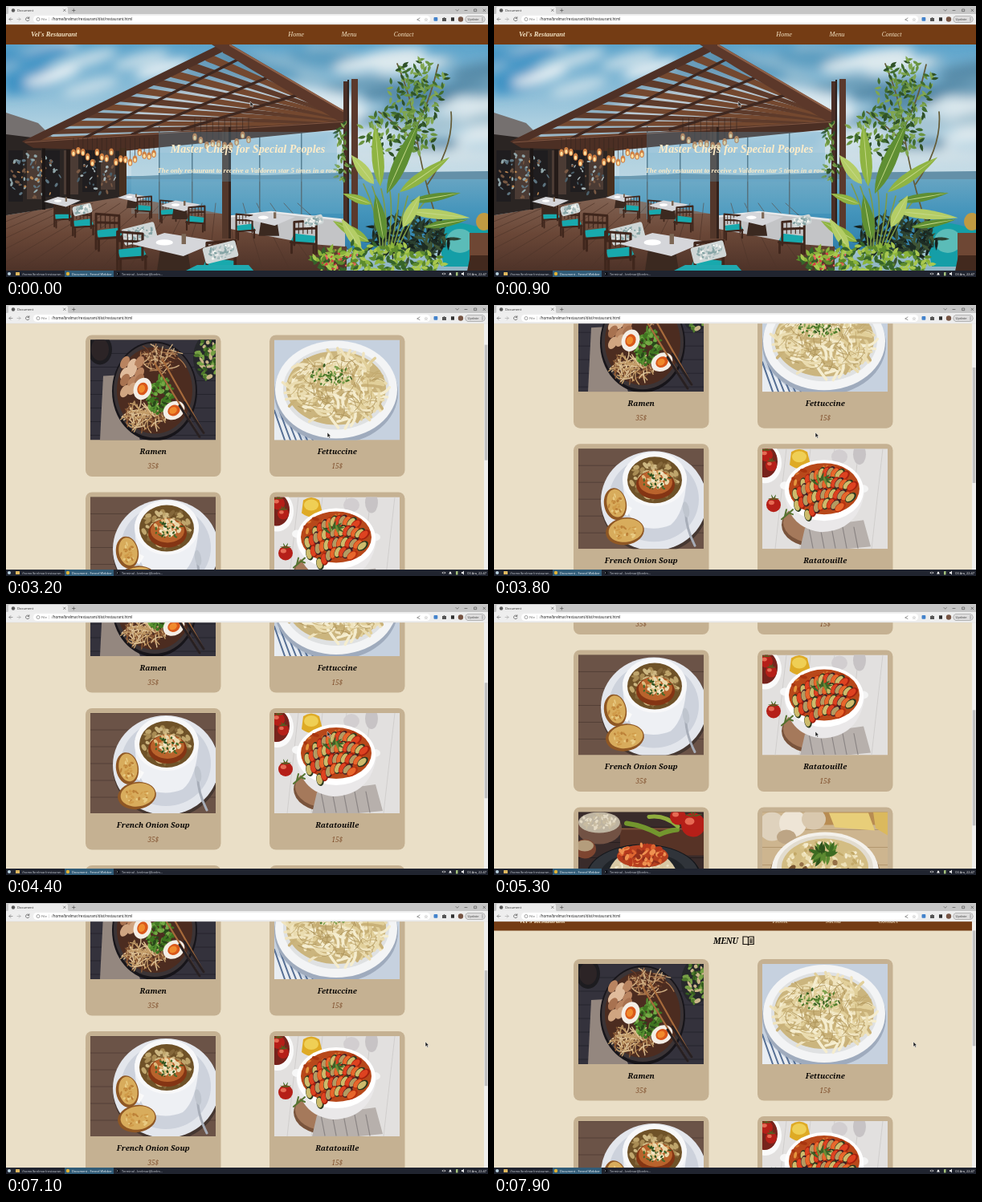
An HTML page that plays this animation: 600 by 338 pixels, repeating every 8 s.

```html
<!DOCTYPE html>
<html lang="en">
<head>
<meta charset="utf-8">
<title>Restaurant</title>
<style>
html, body { margin: 0; width: 100%; height: 100%; overflow: hidden; background: #eadfc7; }
svg { display: block; width: 600px; height: 338px; }
.ui { font-family: "Noto Sans", "Open Sans", sans-serif; }
.script { font-family: "Liberation Serif", serif; font-style: italic; }
.plain { font-family: "Liberation Serif", serif; }
.fancy { font-family: "Noto Serif", serif; font-style: italic; }
.bold { font-weight: bold; }
</style>
</head>
<body>
<svg id="stage" viewBox="0 0 600 338" xmlns="http://www.w3.org/2000/svg"></svg>
<script>
// --- drawing helpers -------------------------------------------------
let seed = 7;
const rnd = () => (seed = (seed * 16807) % 2147483647) / 2147483647;
const pick = list => list[Math.floor(rnd() * list.length)];
const n = v => +v.toFixed(1);
const rect = (x, y, w, h, fill, r = 0) =>
  `<rect x="${n(x)}" y="${n(y)}" width="${n(w)}" height="${n(h)}" rx="${r}" fill="${fill}"/>`;
const oval = (x, y, rx, ry, fill, turn = 0) =>
  `<ellipse cx="${n(x)}" cy="${n(y)}" rx="${n(rx)}" ry="${n(ry)}" fill="${fill}" transform="rotate(${n(turn)} ${n(x)} ${n(y)})"/>`;
const path = (d, fill) => `<path d="${d}" fill="${fill}"/>`;
const line = (d, color, w = 1) =>
  `<path d="${d}" fill="none" stroke="${color}" stroke-width="${n(w)}" stroke-linecap="round"/>`;
const text = (x, y, s, size, cls, fill, anchor = 'middle') =>
  `<text x="${x}" y="${y}" font-size="${size}" class="${cls}" fill="${fill}" text-anchor="${anchor}">${s}</text>`;
const group = (s, attrs = '') => `<g ${attrs}>${s}</g>`;
const times = (count, make) => Array.from({ length: count }, (_, i) => make(i)).join('');
const grad = (id, stops) =>
  `<linearGradient id="${id}" x2="0" y2="1">${stops.map((c, i) =>
    `<stop offset="${i / (stops.length - 1)}" stop-color="${c}"/>`).join('')}</linearGradient>`;

// random points inside an ellipse
const scatter = (count, cx, cy, rx, ry, make) => times(count, () => {
  const a = rnd() * 6.283, r = Math.sqrt(rnd());
  return make(cx + Math.cos(a) * r * rx, cy + Math.sin(a) * r * ry);
});
const crumbs = (count, cx, cy, rx, ry, size, colors) =>
  scatter(count, cx, cy, rx, ry, (x, y) => oval(x, y, size * (.6 + rnd()), size * (.4 + rnd() * .5), pick(colors), rnd() * 180));
// short curved strands with a rounded belly
const strands = (count, cx, cy, rx, ry, len, w, colors) =>
  scatter(count, cx, cy, rx, ry, (x, y) => {
    const a = rnd() * 6.283, dx = Math.cos(a) * len / 2, dy = Math.sin(a) * len / 2, b = (rnd() - .5) * 1.6;
    return line(`M${n(x - dx)} ${n(y - dy)}Q${n(x - dy * b)} ${n(y + dx * b)} ${n(x + dx)} ${n(y + dy)}`, pick(colors), w);
  });
const leaf = (x, y, turn, len, w, fill) =>
  `<path d="M0 0Q${len * .35} ${-w} ${len} 0Q${len * .35} ${w} 0 0" fill="${fill}" transform="translate(${n(x)} ${n(y)}) rotate(${n(turn)})"/>`;

// --- dishes, 156 x 125 each -----------------------------------------
const planks = (base, seam, step) =>
  rect(0, 0, 156, 125, base) + times(Math.ceil(125 / step), i => line(`M0 ${i * step}H156`, seam, .8));

const egg = (x, y, turn) => oval(x, y, 11, 14, '#f4eee6', turn) +
  oval(x, y, 6.5, 8, '#d9581a', turn) + oval(x - 1, y, 4, 5, '#f08a2c', turn);

const ramen = () => planks('#34323c', '#22212a', 17) +
  path('M16 45L34 44 62 125H12Z', '#94877f') +
  oval(12, 12, 15, 19, '#1d1c20') + oval(12, 12, 11, 14, '#2c2426') +
  oval(146, 22, 18, 28, '#26282b') + crumbs(60, 147, 22, 15, 26, 3, ['#4f7a2c', '#77a045', '#355c20', '#c9b588']) +
  oval(80, 64, 53, 62, '#17151a') + oval(80, 63, 51, 59, '#3b3436') + oval(80, 63, 47, 54, '#4c2c20') +
  strands(60, 88, 24, 29, 13, 15, 1.3, ['#cfae82', '#a97950', '#6a3c26']) +
  strands(90, 68, 96, 26, 15, 15, 1.4, ['#dcc094', '#c39c68', '#8c5a35']) +
  times(12, i => oval(43 + (i % 3) * 9, 28 + Math.floor(i / 3) * 11 + (i % 2) * 3, 5, 8.5, pick(['#d0a581', '#b98460', '#e0bc9c', '#a87250']), 30)) +
  crumbs(120, 86, 68, 17, 24, 2.8, ['#3f7420', '#568f30', '#28491a', '#73a844']) +
  egg(65, 61, 20) + egg(104, 88, 60) +
  line('M80 29L136 121M90 25L141 116', '#a66a3b', 2.2) + line('M111 82L136 121M117 78L141 116', '#272022', 3);

const fettuccine = () => rect(0, 0, 156, 125, '#c6d1df') +
  path('M0 92L38 125H0Z', '#e9edf2') +
  times(6, i => line(`M${i * 7} ${88 + i * 2}L${i * 7 + 13} 125`, '#566f94', 2)) +
  oval(77, 66, 77, 63, '#9fabbd') + oval(77, 62, 76, 61, '#f3f4f5') + oval(77, 61, 66, 51, '#dfe1e2') +
  oval(77, 60, 62, 46, '#cbb57e') +
  strands(190, 77, 60, 57, 42, 23, 3.4, ['#eadcb0', '#e1cf9a', '#f5edcf', '#c9b178', '#f0e4bf']) +
  strands(80, 77, 60, 55, 40, 17, .8, ['#a98f54', '#bfa66b']) +
  crumbs(60, 70, 44, 27, 13, 1.7, ['#4e7c2b', '#7ca04c', '#355c20']);

const bread = (x, y, rx, ry, turn) => oval(x, y, rx, ry, '#8f5724', turn) +
  oval(x + 1, y - 1, rx - 2.5, ry - 2.5, '#d8ac5c', turn) +
  crumbs(24, x, y, rx * .6, ry * .6, 2, ['#e8ca82', '#bc8138', '#d09b49']);

const onionSoup = () => planks('#6b5347', '#4f3c34', 21) +
  oval(95, 68, 67, 63, '#453731') + oval(94, 65, 66, 62, '#e3e6ec') + oval(94, 63, 56, 53, '#cdd2dc') +
  path('M55 34Q57 93 80 98Q99 102 115 95Q133 80 135 34Z', '#eef0f4') +
  path('M56 68Q50 78 61 84L67 74Z', '#fafafa') +
  oval(95, 38, 40, 34, '#f8f8f9') + oval(95, 39, 34, 29, '#6f5228') +
  crumbs(110, 95, 38, 29, 24, 3.2, ['#a98c54', '#cdb782', '#84673a', '#bfa56c']) +
  oval(96, 45, 24, 18, '#843514') + oval(96, 42, 21, 15, '#b9632c') +
  crumbs(50, 97, 38, 16, 10, 3, ['#ead8ac', '#dfbd80', '#cf9553', '#f1e6c6']) +
  crumbs(24, 98, 40, 18, 11, 1.6, ['#486a2a', '#2f521d']) +
  line('M134 74Q132 95 145 121', '#a7adb8', 3) + oval(134, 76, 4, 10, '#bfc5ce', -10) +
  bread(46, 69, 14, 20, -10) + bread(58, 103, 24, 17, -8);

const tomato = (x, y, r) => oval(x, y, r, r, '#b51f18') + oval(x - r * .3, y - r * .3, r * .4, r * .3, '#e66a53') +
  times(4, i => leaf(x, y - r * .7, i * 50 - 165, r * .8, 1.5, '#456a24'));

// one curved row of overlapping vegetable slices
const sliceRow = (y, half, count) => times(count, i => {
  const k = i / (count - 1) * 2 - 1, x = 77 + k * half, sy = y + k * k * 9 - k * 5, kind = i % 4;
  return oval(x, sy, 4.8, 8, ['#2c3a20', '#a3200f', '#3d1d24', '#b8300f'][kind], 20 + k * 30) +
    oval(x - .8, sy, 3.6, 6.4, ['#cdbb6c', '#de4220', '#b39b62', '#e8672c'][kind], 20 + k * 30);
});

const ratatouille = () => rect(0, 0, 156, 125, '#e2e0df') +
  times(6, i => line(`M${i * 30} 0L${i * 30 - 14} 125`, '#ccc9c8', .8)) +
  oval(4, 18, 20, 25, '#fafafa') + oval(3, 16, 16, 20, '#77231c') + tomato(5, 8, 8) + tomato(11, 21, 7) +
  path('M36 4Q46 -3 56 4L60 20Q47 30 34 20Z', '#deaa25') + oval(46, 10, 9, 7, '#efcf55') +
  oval(96, 10, 10, 9, '#d2ced0') + oval(121, 7, 8, 13, '#c7c3c5') +
  oval(66, 95, 42, 28, '#7a543c') + oval(66, 92, 40, 26, '#a5795b') +
  path('M53 99L126 89 135 122 105 125H47Z', '#b7b0ac') +
  times(5, i => line(`M${58 + i * 14} 98l5 26`, '#8b8584', 1.2)) +
  path('M27 50Q30 99 73 104Q121 103 128 50Z', '#eae8e9') + oval(28, 46, 6, 5, '#f7f7f7') + oval(125, 50, 7, 5, '#f3f3f3') +
  oval(77, 52, 49, 38, '#fff') + oval(77, 50, 44, 32, '#b8481a') +
  crumbs(50, 77, 44, 40, 25, 3, ['#d9752c', '#a8350f', '#e4953c']) +
  sliceRow(30, 25, 10) + sliceRow(43, 35, 14) + sliceRow(57, 33, 13) + sliceRow(69, 20, 8) +
  times(7, i => leaf(70 + i, 46 - i * 2, i * 35 - 140, 14, 3, pick(['#3d6427', '#6a8d36']))) +
  tomato(14, 70, 9) + line('M24 88L38 76M28 84l2 -8M33 80l5 2', '#55722f', 2);

const rice = () => planks('#392b2a', '#251d1e', 19) +
  rect(52, 20, 104, 34, '#573326') + line('M52 21H156', '#7d5038', 2) +
  oval(26, 20, 28, 20, '#725244') + oval(26, 13, 26, 13, '#beb4a1') + crumbs(70, 26, 12, 23, 10, 2, ['#e4dac4', '#c9bca1']) +
  oval(8, 46, 14, 12, '#7d4530') + oval(8, 42, 11, 7, '#b49d7c') +
  line('M60 14Q82 17 101 28Q112 23 123 22', '#73962e', 6) + line('M88 6Q108 3 124 18', '#90ad3d', 5) +
  tomato(143, 16, 15) + tomato(124, 6, 10) +
  oval(81, 82, 72, 42, '#14171b') + oval(81, 79, 69, 38, '#30343a') + oval(81, 79, 54, 29, '#202429') +
  path('M34 88Q40 48 79 46Q118 48 127 88Q80 111 34 88Z', '#d9caa6') +
  crumbs(150, 80, 79, 42, 20, 2, ['#eee3c6', '#d8c59b', '#f7efd9']) +
  oval(80, 55, 32, 14, '#b74120') + crumbs(65, 80, 54, 29, 13, 3.5, ['#df6631', '#b7391c', '#ef9150', '#92301b']);

const risotto = () => planks('#cdb58f', '#ad9168', 22) +
  rect(76, 0, 80, 16, '#b88c52') + path('M83 1H132L140 23 90 19Z', '#e8ce79') + path('M138 0H156V29L141 20Z', '#dbb95d') +
  oval(12, 18, 17, 18, '#dfd2bd') + oval(38, 14, 17, 17, '#eee5d6') + oval(64, 9, 15, 13, '#d9c8ae') + oval(30, 31, 12, 9, '#bda585') +
  oval(78, 79, 69, 51, '#977a57') + oval(78, 74, 67, 49, '#f4f1eb') + oval(78, 70, 60, 41, '#e2dccf') + oval(78, 69, 54, 36, '#d3bd83') +
  crumbs(180, 78, 69, 51, 34, 2.6, ['#ede0b6', '#d8c389', '#c3a968', '#f4ebcd']) +
  crumbs(20, 78, 69, 46, 28, 4, ['#76532f', '#957047']) +
  times(22, () => leaf(78 + (rnd() - .5) * 16, 49 + rnd() * 7, rnd() * 360, 15, 5, pick(['#3d6b22', '#5c8a31', '#2e511b'])));

// --- hero picture ----------------------------------------------------
const greens = ['#416c2f', '#6a9440', '#80a650', '#2f5127'];
const bulbs = (x0, x1, y, count, top) => times(count, i => {
  const x = x0 + (x1 - x0) * i / (count - 1), by = y + (rnd() - .5) * 16;
  return line(`M${n(x)} ${top}V${n(by)}`, '#35251f', .6) + oval(x, by + 3, 2.8, 4.6, '#cf7f42') + oval(x, by + 4, 1.6, 2.6, '#ffe2a2');
});
const table = (x, y, w) => path(`M${x - w * .16} ${y}h${w * .3}l${w * .05} ${w * .34}h${-w * .4}Z`, '#3b2920') +
  path(`M${x - w / 2} ${y}L${x - w * .12} ${y - w * .13}L${x + w / 2} ${y - w * .03}L${x + w * .1} ${y + w * .14}Z`, '#d5d6da') +
  oval(x - w * .12, y - w * .02, w * .1, w * .035, '#fff') + rect(x + w * .08, y - w * .12, w * .05, w * .12, '#7c6755');
const chair = (x, y, s, flip = 1) => group(
  path('M-13 0L12 -3 16 6 -10 9Z', '#18a9ad') +
  line('M-13 -18V20M-10 9V22M15 6V19M12 -16V10M-13 -18L12 -16M-13 -9L12 -8M-12 9L16 7', '#3f261c', 2.6) +
  line('M-8 -17V-3M-3 -17V-3M2 -16V-3M7 -16V-3', '#3f261c', 1),
  `transform="translate(${x} ${y}) scale(${s * flip} ${s})"`);
const cushion = (x, y, w) => group(rect(-w / 2, -w / 4, w, w / 2, '#cfd6d6', 3) +
  crumbs(45, 0, 0, w * .42, w * .2, 1.7, ['#86a4a5', '#f1f3ef', '#a9bdbd']), `transform="translate(${x} ${y}) rotate(-14)"`);

// roof slats fan out from the right corner to the sloping left edge
const slat = (k, fill) => {
  const x = 32 + 236 * k, y = 166 - 114 * k, end = 149 - 13 * k, w = 4 + 2.5 * k;
  return path(`M${n(x)} ${n(y)}L${n(x + 6)} ${n(y - w / 2)}L424 ${n(end - 1)}V${n(end + 2.5)}L${n(x + 2)} ${n(y + w)}Z`, fill);
};
const pergola = () =>
  path('M24 171L268 50 425 137V151Z', '#58677a').replace('<path', '<path opacity=".25"') +
  times(12, i => slat(i / 11, i % 2 ? '#5e3b2b' : '#74482f')) +
  times(3, i => line(`M${95 + i * 62} ${166 - i * 6}L${290 + i * 38} ${66 + i * 22}`, '#3f2820', 3.4)) +
  path('M20 169L262 50 274 48 276 54 32 173Z', '#4f3126') +
  path('M256 48H280L425 133V150L300 76Z', '#5c382a') + line('M279 49L425 134', '#8e6048', 2.2) +
  path('M20 169L425 143V153L145 181 34 177Z', '#4c2f24') + line('M24 170L425 144', '#805642', 1.2);

const clouds = () => group(
  scatter(14, 80, 78, 120, 28, (x, y) => oval(x, y, 36, 8, pick(['#e6eff3', '#c4dbe6', '#3f93c4']), -15)) +
  scatter(14, 360, 70, 90, 20, (x, y) => oval(x, y, 34, 9, pick(['#3c87b2', '#8fb9cf', '#5a9cc0']), 12)) +
  scatter(24, 520, 120, 110, 66, (x, y) => oval(x, y, 44, 9, pick(['#dce8ed', '#6d9fb9', '#a5c3d1', '#5589a7']), -8)) +
  oval(300, 130, 150, 32, '#dbe9f0') + oval(500, 188, 130, 10, '#cfdfe6'), 'filter="url(#soft)"');

const plants = () =>
  path('M536 278Q556 262 600 280V325H545Z', '#159ea7') + oval(565, 293, 17, 15, '#5bbcb8') + oval(595, 269, 10, 11, '#c09a42') +
  rect(577, 283, 23, 48, '#6e4734') + path('M578 311H600V331H574Z', '#42291e') +
  scatter(160, 505, 288, 48, 26, (x, y) => leaf(x, y, rnd() * 360, 16, 4, pick(['#1d2c24', '#2b4030', '#3f5536', '#16221e']))) +
  line('M538 272Q515 200 510 153Q505 115 487 72M510 153Q529 116 538 73M512 172Q480 142 464 132M525 222Q558 174 554 132', '#645b37', 1.7) +
  scatter(130, 512, 105, 36, 38, (x, y) => leaf(x, y, rnd() * 360, 9, 3.5, pick(greens))) +
  scatter(120, 490, 158, 46, 32, (x, y) => leaf(x, y, rnd() * 360, 10, 4, pick(greens))) +
  scatter(45, 420, 180, 9, 42, (x, y) => leaf(x, y, rnd() * 360, 8, 3, pick(greens))) +
  times(8, i => line(`M${466 + i * 3} 304Q${464 + i * 6} 262 ${445 + i * 11} ${222 + i * 3}`, '#7f9c46', 1.6)) +
  [[466, 225, -95, 78, 15], [474, 234, -66, 98, 17], [458, 222, -128, 46, 14], [490, 232, -35, 76, 13], [503, 244, -10, 64, 10],
   [500, 256, 6, 78, 12], [455, 247, -160, 38, 10], [520, 276, -10, 56, 9], [494, 276, -62, 45, 14], [452, 294, -150, 52, 13],
   [470, 292, -100, 58, 15], [442, 304, -122, 46, 13]]
    .map(([x, y, a, len, w], i) => leaf(x, y, a, len, w, ['#8fb443', '#5f8f33', '#b4cd66'][i % 3]) +
      leaf(x, y, a, len, 1, '#c6d98a')).join('') +
  scatter(260, 463, 319, 79, 22, (x, y) => leaf(x, y, rnd() * 360, 10, 4.5, pick(['#5d8b2d', '#8bb43b', '#a9c850', '#36642a']))) +
  crumbs(25, 416, 317, 25, 13, 1.6, ['#d73e43', '#ef6661']);

const hero = () => rect(0, 47, 600, 284, 'url(#sky)') + clouds() +
  rect(150, 212, 450, 92, 'url(#sea)') + path('M150 213L230 209 320 211 420 208 600 206V216H150Z', '#6490a8') +
  path('M0 261L145 237 285 262 424 300V331H0Z', 'url(#floor)') +
  times(20, i => line(`M${i * 34 - 190} 331L${40 + i * 17} 246`, '#50352a', .7)) +
  // building
  path('M0 133L40 146 60 166 0 172Z', '#75706f') + path('M0 160L145 178V238L0 261Z', '#2b2523') +
  times(6, i => rect(3 + i * 23, 180, 18, 64 - i * 3, i % 2 ? '#4b3b34' : '#1f1d1f')) +
  crumbs(70, 36, 212, 34, 28, 2, ['#bb8651', '#765843', '#8fa5a9', '#5d7480']) +
  crumbs(40, 115, 212, 28, 22, 2, ['#7a5a45', '#4a5f6a', '#a5b4b8']) +
  rect(45, 174, 4, 80, '#1c1716') + rect(75, 178, 5, 70, '#241b18') +
  // glass
  rect(156, 183, 264, 76, '#83bad0').replace('<rect', '<rect opacity=".22"') +
  times(4, i => rect([190, 231, 315, 367][i], 150, 1.5, 116, '#56727f')) +
  path('M274 263L330 257 422 267V300L380 297 274 277Z', '#c3c4c6') + line('M274 263L330 257 422 267', '#e6e8ea', 2.4) +
  pergola() +
  rect(141, 177, 9, 60, '#47301f') + rect(269, 151, 11, 139, '#53372a') + rect(277, 151, 3, 139, '#33211a') +
  rect(420, 94, 7, 184, '#4a2f26') + rect(430, 91, 8, 188, '#5b392c') + rect(425, 92, 2, 186, '#2f211c') +
  bulbs(84, 184, 185, 18, 165) + bulbs(235, 302, 166, 10, 140) +
  // furniture
  chair(70, 260, .75) + table(70, 244, 46) + chair(95, 268, .9) + table(158, 239, 38) + chair(172, 250, .7, -1) +
  chair(201, 255, .7) + table(217, 249, 50) + chair(237, 264, .8, -1) + cushion(95, 254, 24) + chair(127, 280, 1.15) +
  chair(297, 274, .8) + table(328, 265, 64) + chair(372, 287, 1.1, -1) + cushion(383, 268, 24) +
  cushion(166, 284, 42) + chair(155, 304, 1.25) + table(210, 297, 107) + chair(267, 318, 1.4, -1) + cushion(267, 307, 42) +
  path('M222 331L238 323H302L309 331Z', '#20a9b0') +
  plants();

// --- site pages ------------------------------------------------------
const cream = '#f3e3c4', brown = '#743c14', cardFill = '#c5b192', warm = '#fdecc8';
const nav = (id, shift) => group(rect(0, 23, 600, 25, brown) +
  text(31, 38, "Vel's Restaurant", 8.5, 'script bold', cream, 'start') +
  text(361 - shift, 38, 'Home', 8.2, 'script', cream) +
  `<g id="${id}">${text(427 - shift, 38, 'Menu', 8.4, 'script', 'currentColor')}</g>` +
  text(495 - shift, 38, 'Contact', 7.8, 'script', cream));

const dishes = [['Ramen', '35$', ramen], ['Fettuccine', '15$', fettuccine], ['French Onion Soup', '35$', onionSoup],
  ['Ratatouille', '15$', ratatouille], ['Pilaf', '25$', rice], ['Risotto', '20$', risotto]];

const cards = loaded => dishes.map(([name, price, draw], i) => {
  const x = i % 2 ? 328 : 99, y = loaded ? 83.5 + 196 * (i >> 1) : 82.5 + 194 * (i >> 1);
  return group(rect(0, 0, 168.5, loaded ? 176.5 : 175, cardFill, 8) +
    (loaded ? `<svg x="6" y="6" width="156" height="125">${draw()}</svg>` : '') +
    text(84.2, 148.5, name, loaded ? 9.4 : 10, loaded ? 'fancy bold' : 'plain bold', '#080604') +
    text(84.2, loaded ? 167 : 165.5, price, 8.1, loaded ? 'fancy' : 'plain', '#80502d'),
    `transform="translate(${x} ${y})"`);
}).join('');

const book = line('M310 55.5H314.5Q316.5 55.5 316.5 57.2Q316.5 55.5 318.5 55.5H323.2V65H318.5Q316.5 65 316.5 66.3Q316.5 65 314.5 65H310ZM316.5 57V66M318.6 58.5H321.3M318.6 60.6H321.3M318.6 62.6H321.3', '#17120d', 1.2);

// --- browser and desktop --------------------------------------------
const url = '/home/brelmar/restaurant/dist/restaurant.html';
const chrome = rect(0, 0, 600, 11, '#c6c6c6') + path('M1 11Q3 10 3 8V2Q3 1 5 1H75Q77 1 77 3V8Q77 10 79 11Z', '#ececec') +
  oval(9, 5.5, 2.2, 2.2, '#595959') + text(14, 7, 'Document', 4.1, 'ui', '#333', 'start') +
  line('M71.5 4l2.6 2.6M74.1 4l-2.6 2.6M82.5 5.5h3.6M84.3 3.7v3.6', '#444', .6) +
  line('M560 4.5l1.7 1.7 1.7 -1.7M571 5.5h3M583 4h2.7v2.7h-2.7ZM594 4l2.7 2.7M596.7 4L594 6.7', '#444', .6) +
  rect(0, 10, 600, 13, '#eeeeee') + rect(34, 12, 494, 9, '#fff', 4.5) +
  line('M8 16.5H4M5.8 14.6L4 16.5 5.8 18.4', '#777', .7) + line('M14 16.5H18M16.2 14.6L18 16.5 16.2 18.4', '#aaa', .7) +
  line('M28.5 14.8A2.3 2.3 0 1 0 29 17.2M28.8 13.7V15.5H27', '#555', .7) +
  `<circle cx="40" cy="16.5" r="2" fill="none" stroke="#666" stroke-width=".6"/>` +
  text(44, 18.1, 'File', 4.3, 'ui', '#666', 'start') + line('M53.5 14.5V18.5', '#bbb', .4) + text(57, 18.1, url, 4.5, 'ui', '#222', 'start') +
  line('M512 17l3 -2M512 17l3 1.5', '#666', .7) + text(523, 18.7, '☆', 6, 'ui', '#555') +
  rect(532.5, 14, 4.8, 4.8, '#4382cb', 1) + path('M543 15h1.5q1-2 2 0h1.5v4h-5Z', '#555') +
  rect(554, 14.3, 4, 4.4, '#303030') + oval(566, 16.5, 3.2, 3.2, '#765342') +
  rect(571.5, 12.2, 25, 8.6, '#8d8d8d', 4.3) + rect(572.1, 12.8, 23.8, 7.4, '#dedddd', 3.7) + text(581.5, 18, 'Update', 4, 'ui', '#444') +
  times(3, i => oval(593, 14.7 + i * 1.8, .45, .45, '#444')) + line('M0 23H600', '#d5d5d5', .4);

const bar = rect(0, 330, 600, 8, '#20242f') + oval(4, 334, 2, 2, '#b8d1df') +
  rect(12, 332, 5, 4, '#ddb65e', .5) + text(20, 335.6, '/home/brelmar/restauran...', 4, 'ui', '#bfc4cc', 'start') +
  rect(73, 330, 61, 8, '#315c78') + oval(77, 334, 2.2, 2.2, '#e0b438') +
  text(82, 335.6, 'Document - Fennel Webber', 3.9, 'ui', '#f0f3f6', 'start') +
  rect(137, 332, 4.5, 4, '#0e1118') + line('M138 333l1 1 -1 1', '#cbd0d4', .5) +
  text(144, 335.6, 'Terminal - brelmar@brelm...', 3.9, 'ui', '#bfc4cc', 'start') +
  line('M543 334h4M544 333l-1 1 1 1M546 333l1 1 -1 1', '#ddd', .6) +
  path('M551 335.5q1 -1 1 -2.2q1 -1.5 2 0q0 1.2 1 2.2Z', '#eee') + rect(560, 332, 2.5, 4.5, '#a4c27d', .4) +
  path('M567 333h1.4l1.6 -1.4v4.8l-1.6 -1.4H567Z', '#eee') + text(598, 335.6, '03 Ara, 22:47', 3.9, 'ui', '#eee', 'end');

const arrow = `<path id="arrow" d="M0 0V6.2L1.5 5 2.6 7.3 3.6 6.8 2.6 4.6H4.5Z" fill="#222" stroke="#fff" stroke-width=".5"/>`;
const hand = `<path id="hand" d="M-.7 .5Q0 -.5 .7 .5V2.7L3.1 3.2Q4 3.5 3.8 5L3.3 7H-.7L-2.6 4.4Q-2 3.5 -.7 4.4Z" fill="#fff" stroke="#333" stroke-width=".5"/>`;

const stage = document.getElementById('stage');
stage.innerHTML = `<defs>${grad('sky', ['#5ba3cb', '#a9cddf', '#d3e3ea', '#8cb4c4'])}${grad('sea', ['#6aa6c3', '#4394bb', '#2f7fab'])}
  ${grad('floor', ['#836454', '#6a4737', '#4d3228'])}<clipPath id="view"><rect y="23" width="600" height="307"/></clipPath>
  <filter id="soft" x="-20%" y="-20%" width="140%" height="140%"><feGaussianBlur stdDeviation="7"/></filter></defs>` +
  group(
    group(hero() + rect(190, 157, 222, 62, '#5fa3c4').replace('<rect', '<rect opacity=".28"') + nav('homeLink', 0) +
      text(301, 183, 'Master Chefs for Special Peoples', 14.1, 'script bold', warm) +
      text(300, 208, 'The only restaurant to receive a Valdoren star 5 times in a row', 8.7, 'script bold', warm), 'id="home"') +
    group(rect(0, 23, 600, 307, '#eadfc7') +
      group(nav('menuLink', 4.5) +
        group(text(296, 64, 'MENU', 10, 'plain bold', '#080604') + cards(false), 'id="bare"') +
        group(text(288.5, 64, 'MENU', 10, 'fancy bold', '#080604') + book + cards(true), 'id="full"'), 'id="page"') +
      rect(595, 23, 5, 307, '#f0efed') + `<rect id="thumb" x="595.8" width="3.6" height="144" fill="#bfbfbf"/>`, 'id="menu"'),
    'clip-path="url(#view)"') +
  chrome + bar + group(arrow + hand, 'id="pointer"');

// --- motion ----------------------------------------------------------
const LOOP = 8000, OPEN = 1900, LOADED = 2150;
const scrollSteps = [[2900, 0], [3200, 46], [3500, 75], [3900, 112], [4200, 149.5], [4500, 149.5], [4800, 187], [5100, 210],
  [5300, 222], [5750, 346], [5950, 346], [6250, 232.5], [6500, 232.5], [6900, 150], [7250, 100], [7600, 50], [7900, 13.5], [8000, 6]];
const pointerSteps = [[900, 304, 119], [1550, 420, 32.5], [2300, 420, 32.5], [2900, 400, 159], [5400, 400, 159],
  [6000, 523, 184], [6500, 523, 184], [7100, 522, 173]];

function at(steps, t) {
  const i = steps.findIndex(s => s[0] > t);
  if (i === 0) return steps[0].slice(1);
  if (i < 0) return steps[steps.length - 1].slice(1);
  const a = steps[i - 1], b = steps[i], k = (t - a[0]) / (b[0] - a[0]), e = k * k * (3 - 2 * k);
  return a.slice(1).map((v, j) => v + (b[j + 1] - v) * e);
}

const el = Object.fromEntries([...stage.querySelectorAll('[id]')].map(e => [e.id, e]));
const show = (e, on) => { e.style.display = on ? '' : 'none'; };

function render(t) {
  const [scroll] = at(scrollSteps, t), [x, y] = at(pointerSteps, t);
  const over = y < 43 && y > 27 && Math.abs(x - 424) < 13 && scroll === 0;
  show(el.home, t < OPEN);
  show(el.menu, t >= OPEN);
  show(el.bare, t < LOADED);
  show(el.full, t >= LOADED);
  show(el.arrow, !over);
  show(el.hand, over);
  el.homeLink.style.color = el.menuLink.style.color = over ? '#e01010' : cream;
  el.page.setAttribute('transform', `translate(0 ${-scroll})`);
  el.thumb.setAttribute('y', 28 + scroll * .47);
  el.pointer.setAttribute('transform', `translate(${x} ${y})`);
}

const start = performance.now();
function tick() {
  render((performance.now() - start) % LOOP);
  requestAnimationFrame(tick);
}
tick();
</script>
</body>
</html>
```
